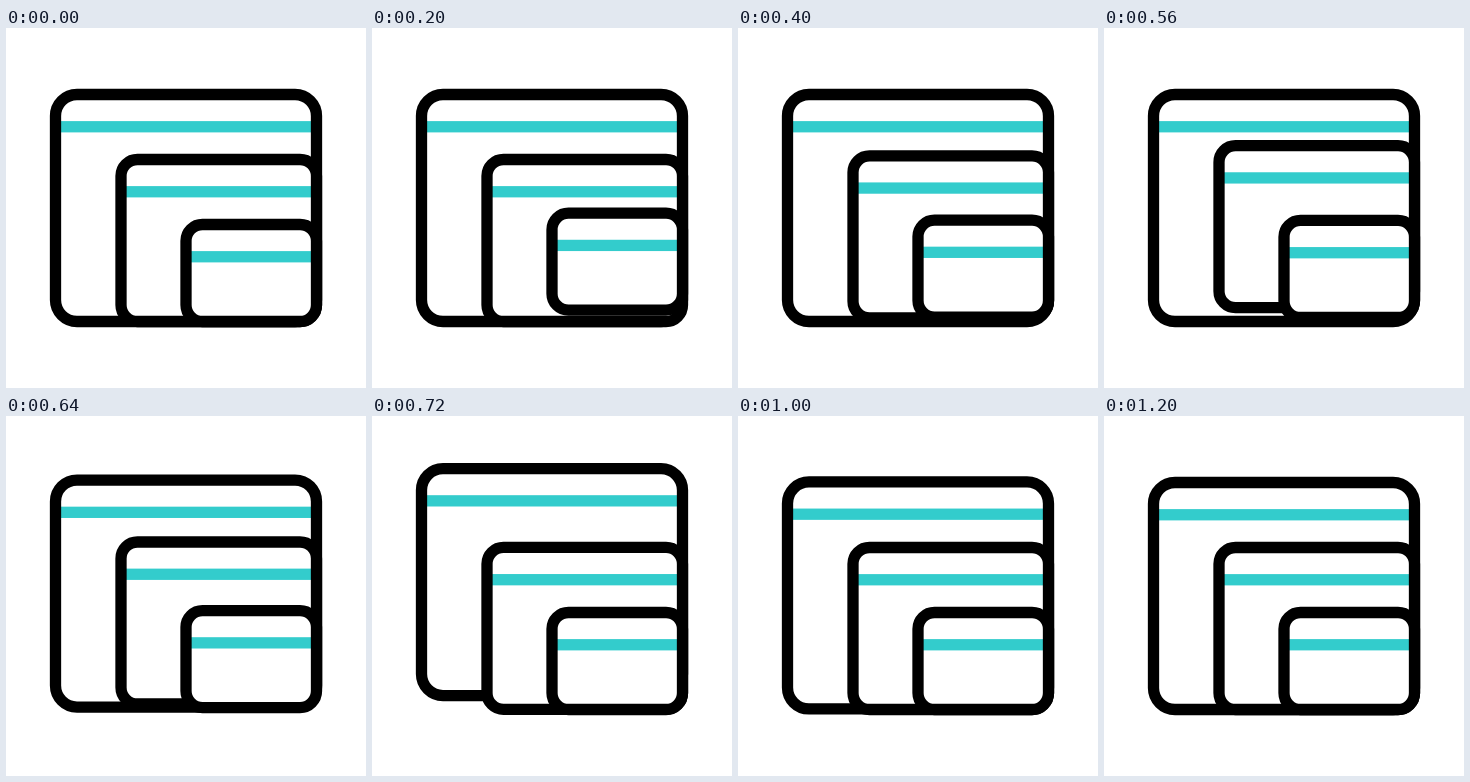
These frames come from a looping animation (360x360 px, 1320 ms). An HTML page:

```html
<!DOCTYPE html>
<html lang="en">
<head>
<meta charset="utf-8">
<title>Hopping windows</title>
<style>
  html, body { margin: 0; width: 100%; height: 100%; overflow: hidden; background: #fff; }
  svg { display: block; width: 100vw; height: 100vh; }
</style>
</head>
<body>
<svg id="stage" viewBox="0 0 360 360"></svg>
<script>
const LOOP = 1320, STEP = 40;
const RIGHT = 310.5, BOTTOM = 293.5, LINE = 11.3;

// Back to front: left and top of the outline's centre, corner radius, start of the hop in ms
const windows = [
  { x: 49.5, y: 66.5, r: 21.5, start: 600 },
  { x: 115, y: 131.5, r: 16.5, start: 350 },
  { x: 180, y: 196.5, r: 16.5, start: 100 }
];

// Time since the start of the hop, height; a hop and a smaller rebound
const hop = [[0, 0], [157, 16], [378, 0], [472, 4.2], [600, 0]];

const stage = document.getElementById("stage");

function add(parent, tag, attrs) {
  const el = document.createElementNS("http://www.w3.org/2000/svg", tag);
  for (const key in attrs) el.setAttribute(key, attrs[key]);
  return parent.appendChild(el);
}

function height(t) {
  for (let i = 1; i < hop.length; i++) {
    const [t0, h0] = hop[i - 1], [t1, h1] = hop[i];
    if (t >= t0 && t < t1) {
      const ease = (1 - Math.cos(Math.PI * (t - t0) / (t1 - t0))) / 2;
      return h0 + (h1 - h0) * ease;
    }
  }
  return 0;
}

for (const w of windows) {
  const width = RIGHT - w.x;
  w.el = add(stage, "g", {});
  const frame = { x: w.x, y: w.y, width, height: BOTTOM - w.y, rx: w.r };
  add(w.el, "rect", { ...frame, fill: "#fff" });
  add(w.el, "rect", { x: w.x, y: w.y + 26.6, width, height: 11.3, fill: "#33cccc" });
  add(w.el, "rect", { ...frame, fill: "none", stroke: "#000", "stroke-width": LINE });
}

const begin = performance.now();

function draw() {
  const t = (performance.now() - begin) % LOOP;
  const tick = Math.floor(t / STEP) * STEP;
  for (const w of windows) {
    w.el.setAttribute("transform", `translate(0 ${-height(tick - w.start)})`);
  }
  requestAnimationFrame(draw);
}
draw();
</script>
</body>
</html>
```
